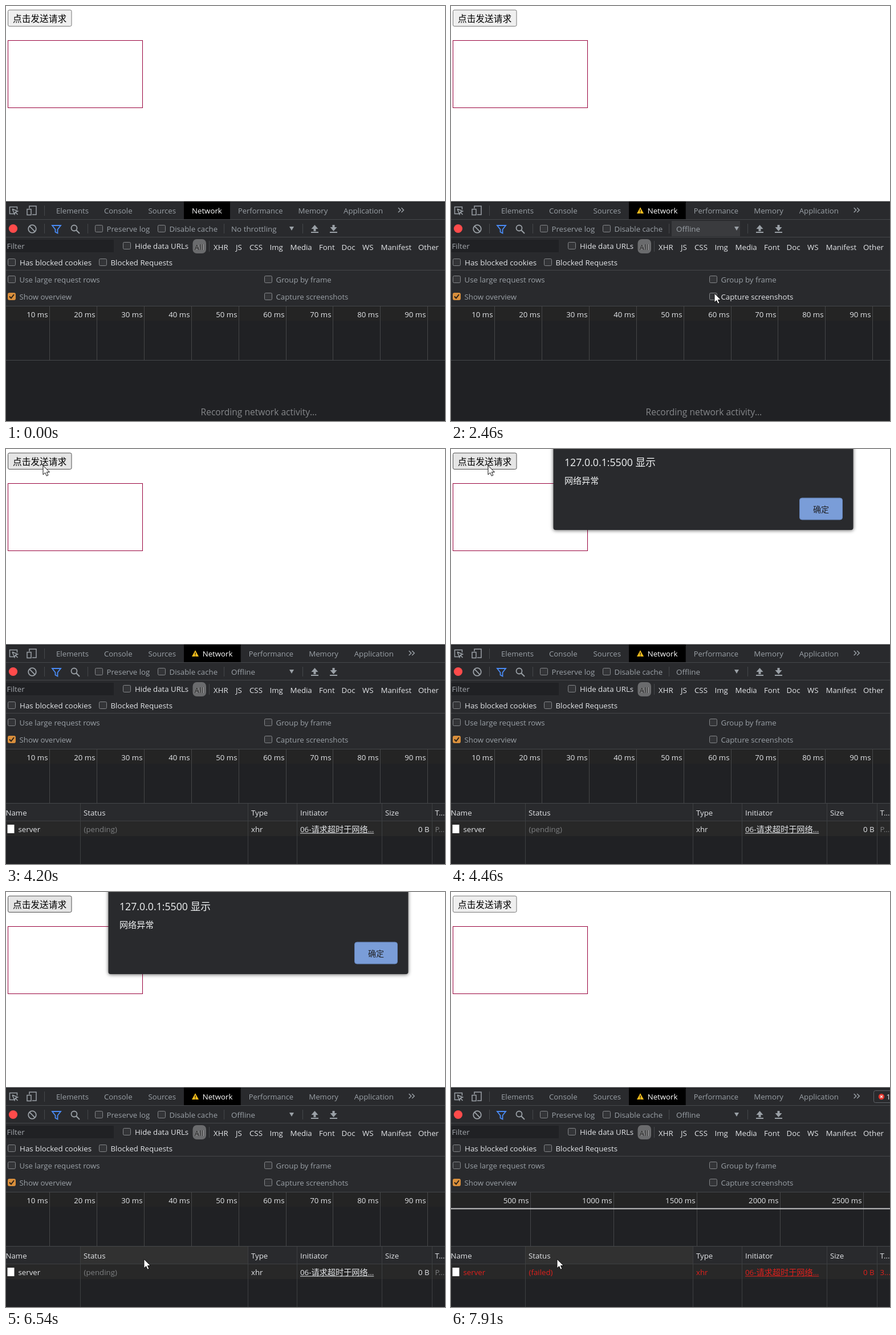
An HTML page with a canvas for the animation above (8000 ms loop, 770 by 728 pixels).

```html
<!DOCTYPE html>
<html lang="zh">
<head>
<meta charset="utf-8">
<title>Network throttling</title>
<style>
html, body { margin: 0; width: 100%; height: 100%; overflow: hidden; background: #fff; }
canvas { display: block; }
</style>
</head>
<body>
<canvas id="stage" width="770" height="728"></canvas>
<script>
const c = document.getElementById('stage').getContext('2d');
const LOOP = 8000, OPEN = 1020, PICK = 2460, SEND = 4200, CLOSE = 7500;
const GREY = '#9aa0a6', LIGHT = '#e3e5e8', LINE = '#45474a', PANEL = '#292a2d', DARK = '#202124';
const SIZE = 13.25;

// Pointer path: time, x, y
const path = [
  [150, 697, 632], [600, 420, 420], [800, 388, 388], [950, 450, 400], [1150, 450, 400],
  [1440, 463, 449], [1850, 462, 497], [2120, 462, 497], [2260, 462, 504], [2460, 462, 504],
  [2800, 492, 494], [3050, 504, 482], [3230, 512, 524], [3300, 500, 460], [4070, 65, 29],
  [4600, 65, 29], [4950, 668, 62], [5300, 672, 100], [5580, 670, 109], [6060, 667, 112],
  [6540, 242, 644], [6680, 237, 668], [6810, 240, 670], [7010, 664, 112], [7480, 664, 112],
  [7910, 186, 644]
];

const clamp = v => Math.max(0, Math.min(1, v));

function pointer(t) {
  let i = path.findIndex(p => p[0] > t);
  if (i === 0) return [-99, -99];
  if (i < 0) return path[path.length - 1].slice(1);
  const [a, ax, ay] = path[i - 1], [b, bx, by] = path[i], k = (t - a) / (b - a);
  return [ax + (bx - ax) * k, ay + (by - ay) * k];
}

function rect(x, y, w, h, color) {
  c.fillStyle = color;
  c.fillRect(x, y, w, h);
}

function round(x, y, w, h, r, fill, stroke) {
  c.beginPath();
  c.roundRect(x, y, w, h, r);
  if (fill) { c.fillStyle = fill; c.fill(); }
  if (stroke) { c.strokeStyle = stroke; c.lineWidth = 1; c.stroke(); }
}

// y is the baseline; returns the right edge
function text(s, x, y, color = GREY, size = SIZE, align = 'left', weight = 400) {
  c.font = `${weight} ${size}px "Open Sans", "Noto Sans CJK SC", "Noto Sans CJK", sans-serif`;
  c.textAlign = align;
  c.fillStyle = color;
  c.fillText(s, x, y);
  return x + c.measureText(s).width;
}

function draw(d, color, x = 0, y = 0, width = 0) {
  const p = new Path2D(d);
  c.save();
  c.translate(x, y);
  c.fillStyle = c.strokeStyle = color;
  c.lineWidth = width;
  width ? c.stroke(p) : c.fill(p);
  c.restore();
}

function ring(x, y, r, color, width) {
  c.beginPath();
  c.arc(x, y, r, 0, 7);
  c.fillStyle = c.strokeStyle = color;
  c.lineWidth = width;
  width ? c.stroke() : c.fill();
}

function check(x, y, label, color = GREY, labelX = x + 20.5, size = SIZE, on = false) {
  round(x + .5, y + .5, 13, 12, 2, on ? '#d98f3c' : '#333437', on ? '#d98f3c' : '#85878a');
  if (on) draw('M3 6.5 6 9.5 11 3', '#2a2118', x, y, 2);
  text(label, labelX, y + 12, color, size);
}

function page(pressed) {
  rect(0, 0, 770, 343, '#fff');
  round(3.5, 7, 111.5, 28.5, 2.5, pressed ? '#e5e5e5' : '#efefef', pressed ? '#4f4f4f' : '#767676');
  text('点击发送请求', 12, 27.5, '#000', 15.7);
  c.strokeStyle = '#98003c';
  c.lineWidth = 1;
  c.strokeRect(3.5, 60.5, 236, 118);
}

function tabs(warn, failed) {
  const shift = warn ? 18.7 : 0;
  draw('M9 13.5H1.5V1.5H14.5V6M6 5 15.5 9 11.5 10.5 15.5 15M6 5 10 14.5 11.5 10.5', GREY, 5, 351, 1.5);
  draw('M5 5V1H17V16H10M1 6.5H8V16.5H1Z', GREY, 36, 350, 1.5);
  rect(67, 350, 1, 18, LINE);
  rect(312, 343, 81 + shift, 31, '#000');
  for (const [s, x] of [['Elements', 88], ['Console', 172], ['Sources', 249.5]]) text(s, x, 364);
  text('Network', 326 + shift, 364, '#fff');
  if (warn) {
    draw('M6 0 12 11H0Z', '#f5bd1a', 326, 353);
    rect(331.4, 357, 1.3, 4, '#222');
    rect(331.4, 362, 1.3, 1.3, '#222');
  }
  text('Performance', 407 + shift, 364, GREY, 12.95);
  text('Memory', 512.5 + shift, 364);
  text('Application', 592 + shift, 364);
  draw('M0 0 4 4 0 8M5.5 0 9.5 4 5.5 8', GREY, 688 + shift, 354, 1.5);
  if (failed) {
    round(741.5, 348.5, 40, 21, 3, null, '#5f6368');
    ring(755, 359, 5.2, '#e2372f');
    draw('M-2-2 2 2M2-2-2 2', '#fff', 755, 359, 1.2);
    text('1', 763.5, 364, LIGHT);
  }
}

function toolbar(t) {
  ring(12.5, 390.5, 7.6, '#ff4b4b');
  ring(46, 391, 6.8, GREY, 1.8);
  draw('M-4.8-4.8 4.8 4.8', GREY, 46, 391, 1.8);
  draw('M1 1H16L10.5 8V14.5L6.5 12.5V8Z', '#4a8bf5', 80, 384, 1.8);
  ring(119.5, 389.5, 5, GREY, 1.8);
  draw('M0 0 6 6', GREY, 123, 393, 2);
  for (const x of [67, 143, 382, 520]) rect(x, 382, 1, 17, LINE);
  check(156, 384, 'Preserve log');
  check(266, 384, 'Disable cache');
  if (t >= OPEN && t < SEND) rect(387, 377, 120, 27, '#3a3b3e');
  text(t < PICK ? 'No throttling' : 'Offline', 395, 396, GREY, 13.4);
  draw('M0 0H8L4 7Z', GREY, 497, 387);
  const arrow = 'M6 0 12 7H8V11H4V7H0Z';
  draw(arrow, GREY, 535.5, 384);
  rect(535, 396, 13, 2, GREY);
  c.save();
  c.translate(1149, 779);
  c.rotate(Math.PI);
  draw(arrow, GREY, 568.5, 384);
  c.restore();
  rect(568, 396, 13, 2, GREY);
}

function filters() {
  rect(0, 410, 189, 22, DARK);
  text('Filter', 1.5, 426, '#a3a7ac');
  check(205, 414, 'Hide data URLs', LIGHT, 226);
  round(327.5, 409, 23.5, 25, 7, '#6a6b6d');
  text('All', 332, 428, '#b0b0b0');
  text('All', 331, 427.5, '#1c1c1c');
  rect(356, 412, 1, 19, LINE);
  const types = { XHR: 364, JS: 403, CSS: 427, Img: 462.5, Media: 498.5, Font: 549, Doc: 588.5, WS: 625, Manifest: 657.5, Other: 723 };
  for (const s in types) text(s, types[s], 428, LIGHT);
  check(3, 443, 'Has blocked cookies', LIGHT, 24, 13.4);
  check(163, 443, 'Blocked Requests', LIGHT, 183.5);
}

function settings(x, y) {
  const over = (a, b) => x > 450 && x < 605 && y >= a && y < b ? LIGHT : GREY;
  check(3, 473, 'Use large request rows');
  check(453, 473, 'Group by frame', over(458, 495));
  check(3, 503, 'Show overview', GREY, 23.5, SIZE, true);
  check(453, 503, 'Capture screenshots', over(495, 526));
}

function overview(failed) {
  rect(0, 527, 770, 25, '#242424');
  const first = failed ? 139 : 76, step = failed ? 146 : 82.9, unit = failed ? 500 : 10;
  for (let i = 0; first + i * step < 770; i++) {
    const x = Math.round(first + i * step);
    rect(x, 527, 1, 94, '#454648');
    text((i + 1) * unit + ' ms', x - 2.5, 546, LIGHT, SIZE, 'right');
  }
  if (failed) rect(0, 554.5, 770, 2, '#c6c6c6');
}

function table(x, y, failed) {
  const cols = [130, 424, 510, 659, 747];
  const ink = failed ? '#e0201c' : LIGHT, dim = failed ? ink : '#7d7f81';
  rect(0, 622, 770, 31, PANEL);
  [0, ...cols].forEach((left, i) => {
    const right = cols[i] || 770;
    if (y >= 622 && y < 653 && x >= left && x < right) rect(left, 622, right - left, 31, '#313131');
  });
  rect(0, 653, 770, 26, y >= 653 && y < 679 ? '#303133' : '#282828');
  rect(0, 652, 770, 1, '#3d3f41');
  for (const left of cols) rect(left, 622, 1, 106, '#3d3f41');
  const heads = { Name: -.5, Status: 136, Type: 430, Initiator: 516, Size: 665, 'T...': 752.5 };
  for (const s in heads) text(s, heads[s], 643, LIGHT);
  rect(2.5, 659, 12, 15, '#fff');
  text('server', 21.5, 672, ink);
  text(failed ? '(failed)' : '(pending)', 136.5, 672, dim);
  text('xhr', 430, 672, ink);
  let end = text('06-', 516, 672, ink);
  end = text('请求超时于网络', end, 672, ink, 14.2);
  end = text('...', end, 672, ink);
  rect(516, 673.5, end - 516, 1, ink);
  text('0 B', 742.5, 672, ink, SIZE, 'right');
  text(failed ? '3...' : 'P...', 752.5, 672, dim);
}

function devtools(t, x, y) {
  const failed = t >= CLOSE;
  rect(0, 342.5, 770, 183.5, PANEL);
  rect(0, 526, 770, 202, DARK);
  tabs(t >= PICK, failed);
  toolbar(t);
  filters();
  settings(x, y);
  overview(failed);
  for (const line of [374, 405, 463, 526, 621]) rect(0, line, 770, 1, LINE);
  if (t >= SEND) table(x, y, failed);
  else text('Recording network activity…', 341.5, 717.5, '#85878a', 15.6);
}

function menu(y) {
  const row = 19.75, rows = ['Disabled', 'No throttling', 'Presets', 'Fast 3G', 'Slow 3G', 'Offline', 'Custom', 'Add...'];
  let pick = Math.max(1, Math.floor((y - 404) / row));
  if (pick === 2) pick = 1;
  round(387.5, 404.5, 118, 158, 0, DARK, '#6a6c6f');
  rect(387, 404 + pick * row, 119, row, '#1e90ff');
  rows.forEach((s, i) => {
    const group = i % 2 === 0 && i !== 4;
    text(s, group ? 395 : 409, 419 + i * row, i === pick ? '#fff' : group ? '#b4b6b9' : GREY, SIZE, 'left', group ? 700 : 400);
  });
}

function tooltip(t) {
  c.globalAlpha = clamp((t - 2950) / 120) * clamp(1 - (t - 3230) / 170);
  round(474, 490, 282, 32, 2, PANEL, '#3a3b3e');
  text('Group requests by top level request frame', 484, 511.5, '#b4b6b9');
  c.globalAlpha = 1;
}

function dialog(t) {
  c.save();
  c.globalAlpha = clamp((t - SEND) / 150) * clamp(1 - (t - CLOSE) / 220);
  c.translate(0, -16 * Math.exp((SEND - t) / 125));
  c.shadowColor = 'rgba(0,0,0,.6)';
  c.shadowBlur = 6;
  c.shadowOffsetY = 1;
  round(179.5, -30, 526, 174, 4, PANEL);
  c.shadowColor = 'transparent';
  text('127.0.0.1:5500 显示', 199, 31.5, '#f1f3f4', 17.7);
  text('网络异常', 199, 62.8, '#f1f3f4', 15.1);
  round(611.5, 88, 75, 38, 4, '#7a9dd8', t < 7220 ? '#6585bb' : null);
  text('确定', 649, 112.5, DARK, 14, 'center');
  c.restore();
}

function cursor(x, y) {
  const arrow = 'M0 0V16L3.7 12.6 6.2 18.2 8.9 17 6.4 11.5H11.4Z';
  draw(arrow, '#fff', x, y);
  draw(arrow, '#111', x, y, 1);
}

function frame(now) {
  const t = now % LOOP, [x, y] = pointer(t);
  page(t >= 4000 && t < CLOSE);
  devtools(t, x, y);
  if (t >= OPEN && t < PICK) menu(y);
  if (t > 2950 && t < 3400) tooltip(t);
  if (t >= SEND) dialog(t);
  cursor(x, y);
}

let start;
function tick(now) {
  start ??= now;
  frame(now - start);
  requestAnimationFrame(tick);
}
requestAnimationFrame(tick);
</script>
</body>
</html>
```
